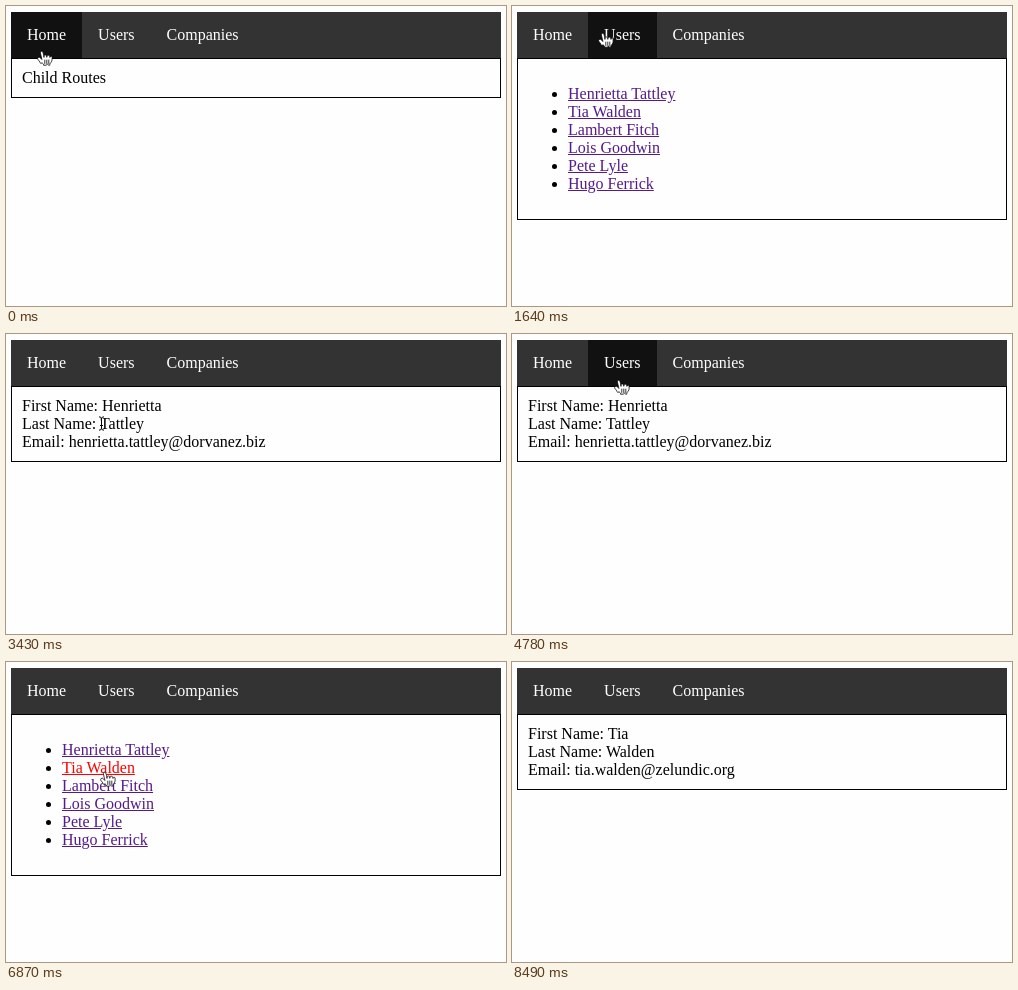
Write an HTML page that moves like this. It is 500 px wide and 300 px high and loops after 9260 ms.

```html
<!DOCTYPE html>
<html lang="en">
<head>
<meta charset="utf-8">
<title>Child Routes</title>
<style>
  html, body { margin: 0; width: 100%; height: 100%; overflow: hidden; background: #fefefe; }
  body { position: relative; font: 16px/18px "Liberation Serif", Times, serif; color: #000; }
  nav { position: absolute; left: 5px; top: 6px; width: 490px; height: 46px; display: flex; background: #333; }
  nav span { padding: 14px 16px; color: #fff; }
  nav .hover { background: #111; }
  main { position: absolute; left: 5px; top: 52px; width: 468px; padding: 10px; border: 1px solid #000; }
  ul { margin: 16px 0; padding-left: 40px; }
  li span { color: #551a8b; text-decoration: underline; }
  li .active { color: #f00; }
  svg { position: absolute; left: 0; top: 0; width: 500px; height: 300px; }
</style>
</head>
<body>
<nav><span>Home</span><span>Users</span><span>Companies</span></nav>
<main></main>
<svg viewBox="0 0 500 300">
  <g id="hand" stroke="#000" stroke-width=".8" stroke-linejoin="round" stroke-linecap="round">
    <path transform="translate(-7.8 -7.2)" fill="#fff" d="M11.3 20.4c-.3-.4-.6-1.1-1.2-2-.3-.5-1.2-1.5-1.5-1.9-.2-.4-.2-.6-.1-1 .1-.6.7-1.1 1.4-1.1.5 0 1 .4 1.4.7.2.2.5.6.7.8.2.2.2.3.4.5.2.3.3.5.2.1-.1-.5-.2-1.3-.4-2.1-.1-.6-.2-.7-.3-1.1-.1-.5-.2-.8-.3-1.3-.1-.3-.2-1.1-.3-1.5-.1-.5-.1-1.4.3-1.8.3-.3.9-.4 1.3-.2.5.3.8 1 .9 1.3.2.5.4 1.2.5 2 .2 1 .5 2.5.5 2.8 0-.4-.1-1.1 0-1.5.1-.3.3-.7.7-.8.3-.1.6-.1.9-.1.3.1.6.3.8.5.4.6.4 1.9.4 1.8.1-.4.1-1.2.3-1.6.1-.2.5-.4.7-.5.3-.1.7-.1 1 0 .2 0 .6.3.7.5.2.3.3 1.3.4 1.7 0 .1.1-.4.3-.7.4-.6 1.8-.8 1.9.6v2.1c0 .5-.1.8-.2 1.3-.1.3-.3.8-.5 1.1-.2.3-.8 1.1-.8 1.1s-.6.7-.7 1c-.1.3-.1.3-.1.5v.8s-.7.1-1.1 0c-.4-.1-.8-.8-1-1-.1-.3-.4-.2-.5 0-.2.3-.6.9-.9 1-.6.1-1.8 0-2.7 0 0 0 .2-.9-.2-1.2-.3-.3-.8-.8-1.1-1z"/>
    <path transform="translate(-7.8 -7.2)" d="M15.6 17.3v3.4M17.6 17.2v3.5M19.6 17.2v3.5"/>
  </g>
  <path id="arrow" d="M1 1v14.2l3.3-3.1 2.1 5 2.3-1-2.1-4.9h4.6z" stroke="#fff"/>
  <g id="beam" fill="none">
    <path d="M1 .8q2.5 0 2.5 2v9.4q0 2-2.5 2M6 .8q-2.5 0-2.5 2v9.4q0 2 2.5 2M2 9.5h3" stroke="#fff" stroke-width="2.2"/>
    <path d="M1 .8q2.5 0 2.5 2v9.4q0 2-2.5 2M6 .8q-2.5 0-2.5 2v9.4q0 2 2.5 2M2 9.5h3" stroke="#000"/>
  </g>
</svg>
<script>
const LOOP = 9260;
const users = ["Henrietta Tattley", "Tia Walden", "Lambert Fitch", "Lois Goodwin", "Pete Lyle", "Hugo Ferrick"];

const list = active => "<ul>" + users.map((name, i) =>
  `<li><span${i === active ? ' class="active"' : ""}>${name}</span></li>`).join("") + "</ul>";

const detail = (i, domain) => {
  const [first, last] = users[i].split(" ");
  return `First Name: ${first}<br>Last Name: ${last}<br>Email: ${first}.${last}@`.replace(/\S+@$/, s => s.toLowerCase()) + domain;
};

// Each track: [start in ms, value...]
const views = [
  [0, "Child Routes"], [1640, list()], [3430, detail(0, "dorvanez.biz")],
  [5820, list()], [6870, list(1)], [7010, detail(1, "zelundic.org")]
];
const hovers = [[0, 0], [450, 1], [2380, -1], [4780, 1], [6120, -1]];
const pointer = [
  [0, "hand", 31, 44], [150, "hand", 33, 43], [300, "hand", 57, 30], [450, "hand", 75, 26],
  [590, "hand", 85, 26], [740, "hand", 86, 26], [2240, "hand", 86, 29],
  [2380, "arrow", 90, 68], [2530, "hand", 90, 86], [2680, "hand", 90, 89],
  [3430, "beam", 92, 82], [4480, "beam", 96, 66], [4630, "arrow", 101, 54],
  [4780, "hand", 102, 45], [6120, "hand", 94, 94], [6270, "hand", 94, 109],
  [7010, "beam", 96, 102], [7160, "arrow", 200, 97], [7300, "arrow", 238, 90],
  [8200, "arrow", 302, 122], [8350, "arrow", 451, 261], [8490, "none", 0, 0]
];

const at = (track, t) => track.findLast(step => step[0] <= t);
const main = document.querySelector("main");
const tabs = document.querySelectorAll("nav span");
const shapes = ["hand", "arrow", "beam"].map(id => document.getElementById(id));
let shown;

function draw() {
  const t = performance.now() % LOOP;
  const view = at(views, t)[1], hover = at(hovers, t)[1];
  const [, kind, x, y] = at(pointer, t);
  if (view !== shown) main.innerHTML = shown = view;
  tabs.forEach((tab, i) => tab.classList.toggle("hover", i === hover));
  for (const shape of shapes) {
    shape.style.display = shape.id === kind ? "" : "none";
    shape.setAttribute("transform", `translate(${x} ${y})`);
  }
  requestAnimationFrame(draw);
}
draw();
</script>
</body>
</html>
```
